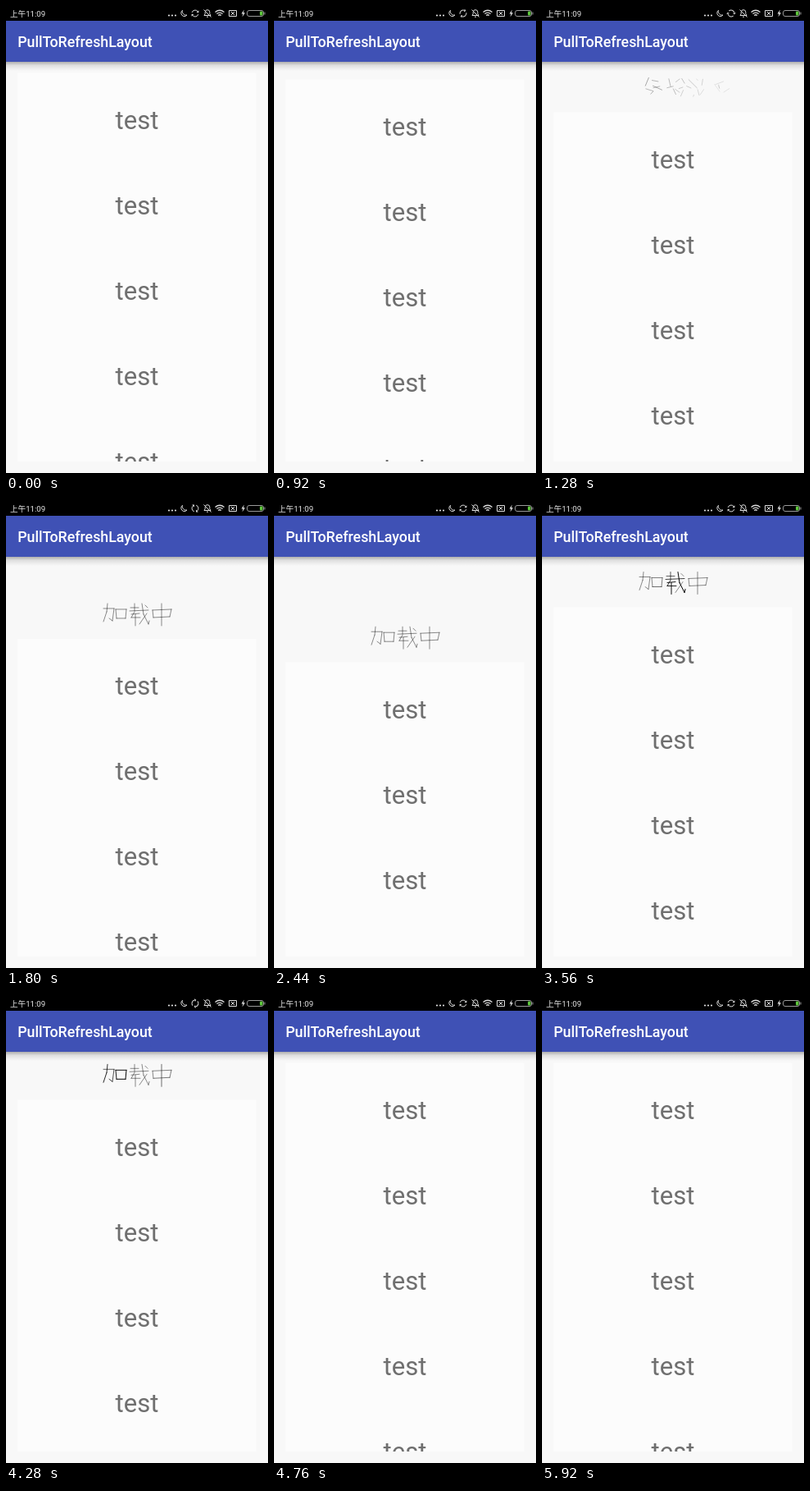
Write an HTML page that moves like this. It is 320 px wide and 569 px high and loops after 6000 ms.

```html
<!DOCTYPE html>
<html lang="en">
<head>
<meta charset="utf-8">
<title>Pull to refresh</title>
<style>
  html, body { margin: 0; width: 100%; height: 100%; overflow: hidden; background: #f8f8f8; }
  svg { display: block; width: 100%; height: 100%; }
  text { font-family: Roboto, "Noto Sans CJK SC", "Noto Sans CJK", sans-serif; }
</style>
</head>
<body>
<svg viewBox="0 0 320 569">
  <defs>
    <linearGradient id="shade" x1="0" y1="0" x2="0" y2="1">
      <stop offset="0" stop-color="#000" stop-opacity=".3"/>
      <stop offset=".4" stop-color="#000" stop-opacity=".1"/>
      <stop offset="1" stop-color="#000" stop-opacity="0"/>
    </linearGradient>
    <clipPath id="content"><rect x="14" y="81.6" width="292" height="473.4"/></clipPath>
  </defs>
  <rect width="320" height="569" fill="#f8f8f8"/>

  <g clip-path="url(#content)">
    <g id="header" stroke="#000" stroke-linecap="round"></g>
    <g id="list">
      <rect x="14" y="81.6" width="291.6" height="560" fill="#fcfcfc"/>
    </g>
  </g>

  <rect y="68" width="320" height="11" fill="url(#shade)"/>
  <rect y="17" width="320" height="51" fill="#3f51b5"/>
  <text x="14.2" y="50" font-size="17.78" font-weight="500" fill="#fff">PullToRefreshLayout</text>

  <rect width="320" height="18" fill="#000"/>
  <text x="5" y="12.6" font-size="9.6" fill="#e6e6e6">上午11:09</text>
  <g fill="none" stroke="#ddd">
    <path d="M199 11.5h.01M203 11.5h.01M207 11.5h.01" stroke-width="2.2" stroke-linecap="round"/>
    <path d="M215.500 5.300A4 4 0 1 0 221 11A4.600 4.600 0 0 1 215.500 5.300Z"/>
    <g id="sync">
      <path d="M-3.800 -1.200A4 4 0 0 1 3 -2.600M3.800 1.200A4 4 0 0 1 -3 2.600"/>
      <path d="M4.400 -3.800V-1H1.600ZM-4.400 3.800V1H-1.600Z" fill="#ddd" stroke="none"/>
    </g>
    <path d="M242 11.500H250L248.800 9.500V7.500A2.800 2.800 0 0 0 243.200 7.500V9.500ZM245 13.200H247M241.500 4.500L250.500 13.500"/>
    <path d="M255.500 7.500Q261 3 266.500 7.500M257.400 9.600Q261 6.600 264.600 9.600M259.200 11.500Q261 10 262.800 11.500" stroke-width="1.300"/>
    <path d="M272.500 5.500H281.500V12.500H272.500ZM275 7L279 11M279 7L275 11"/>
    <path d="M290.800 4.500L287.500 9.500H289.500L288.500 13.500L292 8.300H290Z" fill="#ddd" stroke="none"/>
    <rect x="294.500" y="5.500" width="20" height="7" rx="2.500" stroke="#999"/>
    <path d="M316 7.500V10.500" stroke="#999"/>
    <rect x="310" y="6.500" width="3.500" height="5" rx="1" fill="#5ec63c" stroke="none"/>
  </g>
</svg>
<script>
const LOOP = 6000, TICK = 40;
const PULL = 860, RELEASE = 2560, SETTLED = 2960, CLOSE = 4200, CLOSED = 4680;
const REST = 48, FORMED = 84;
const SHIMMER = 2780, PERIOD = 1120, FADE = 600, DIM = 0.45;
const FACTOR = 0.7;

const $ = id => document.getElementById(id);
const add = (parent, tag, attrs, text = "") => {
  const el = document.createElementNS("http://www.w3.org/2000/svg", tag);
  for (const key in attrs) el.setAttribute(key, attrs[key]);
  el.textContent = text;
  return parent.appendChild(el);
};
const clamp = v => Math.min(1, Math.max(0, v));
const ease = v => (1 - Math.cos(Math.PI * clamp(v))) / 2;

// Pen paths of 加, 载 and 中; each leg becomes one bar.
const paths = [
  "119,6 132,6 130,21 126,18", "124,0 123,10 119,22",
  "135,18 134,7 147,7 146,18 135,18",
  "152,5 162,5", "157,0 157,9", "151,9 174,8", "157,10 153,17 164,17",
  "153,13 163,12", "158,13 158,27", "166,0 168,13 174,25 175,21",
  "172,12 163,25", "170,2 173,5",
  "180,17 179,8 202,7 200,16 180,17", "190,0 190,27"
];
const bars = paths.flatMap(path => {
  const points = path.split(" ").map(p => p.split(",").map(Number));
  return points.slice(1).map((b, i) => [points[i], b]);
}).map(([a, b], i) => {
  const dx = (b[0] - a[0]) / 2, dy = (b[1] - a[1]) / 2;
  return {
    x: a[0] + dx, y: a[1] + dy + 38.5,
    scatter: 15 + 55 * (i * 0.618 % 1),
    el: add($("header"), "line", { x1: -dx, y1: -dy, x2: dx, y2: dy })
  };
});

for (let i = 0; i < 5; i++) {
  add($("list"), "text", {
    x: 160, y: 149.8 + 104 * i, "font-size": 31.1,
    "text-anchor": "middle", fill: "#6f6f6f"
  }, "test");
}

const dragged = t => 150.5 * (1 - Math.exp(-Math.max(0, t - PULL) / 1100));

function offsetAt(t) {
  if (t < RELEASE) return dragged(t);
  const peak = dragged(RELEASE);
  if (t < CLOSE) return peak + (REST - peak) * ease((t - RELEASE) / (SETTLED - RELEASE));
  return REST * (1 - ease((t - CLOSE) / (CLOSED - CLOSE)));
}

function shimmer(t, i) {
  const age = t - SHIMMER - i * PERIOD / bars.length;
  return age < 0 ? DIM : 1 - (1 - DIM) * ease(age % PERIOD / FADE);
}

function render(t) {
  const offset = offsetAt(t);
  const progress = t < RELEASE ? clamp(offset / FORMED) : 1;
  const shift = `translate(0 ${offset})`;
  $("list").setAttribute("transform", shift);
  $("header").setAttribute("transform", shift);
  bars.forEach((bar, i) => {
    const start = (1 - FACTOR) * i / bars.length;
    const p = clamp((progress - start) / FACTOR);
    const x = bar.x + bar.scatter * (1 - p);
    bar.el.setAttribute("transform", `translate(${x} ${bar.y}) rotate(${360 * p}) scale(${p})`);
    bar.el.setAttribute("opacity", p < 1 ? DIM * p : shimmer(t, i));
  });
  const turn = 30 * Math.floor((t + 120) / 200);
  $("sync").setAttribute("transform", `translate(231 9) rotate(${turn})`);
}

const begin = performance.now();
function frame() {
  const t = (performance.now() - begin) % LOOP;
  render(Math.floor(t / TICK) * TICK);
  requestAnimationFrame(frame);
}
frame();
</script>
</body>
</html>
```
